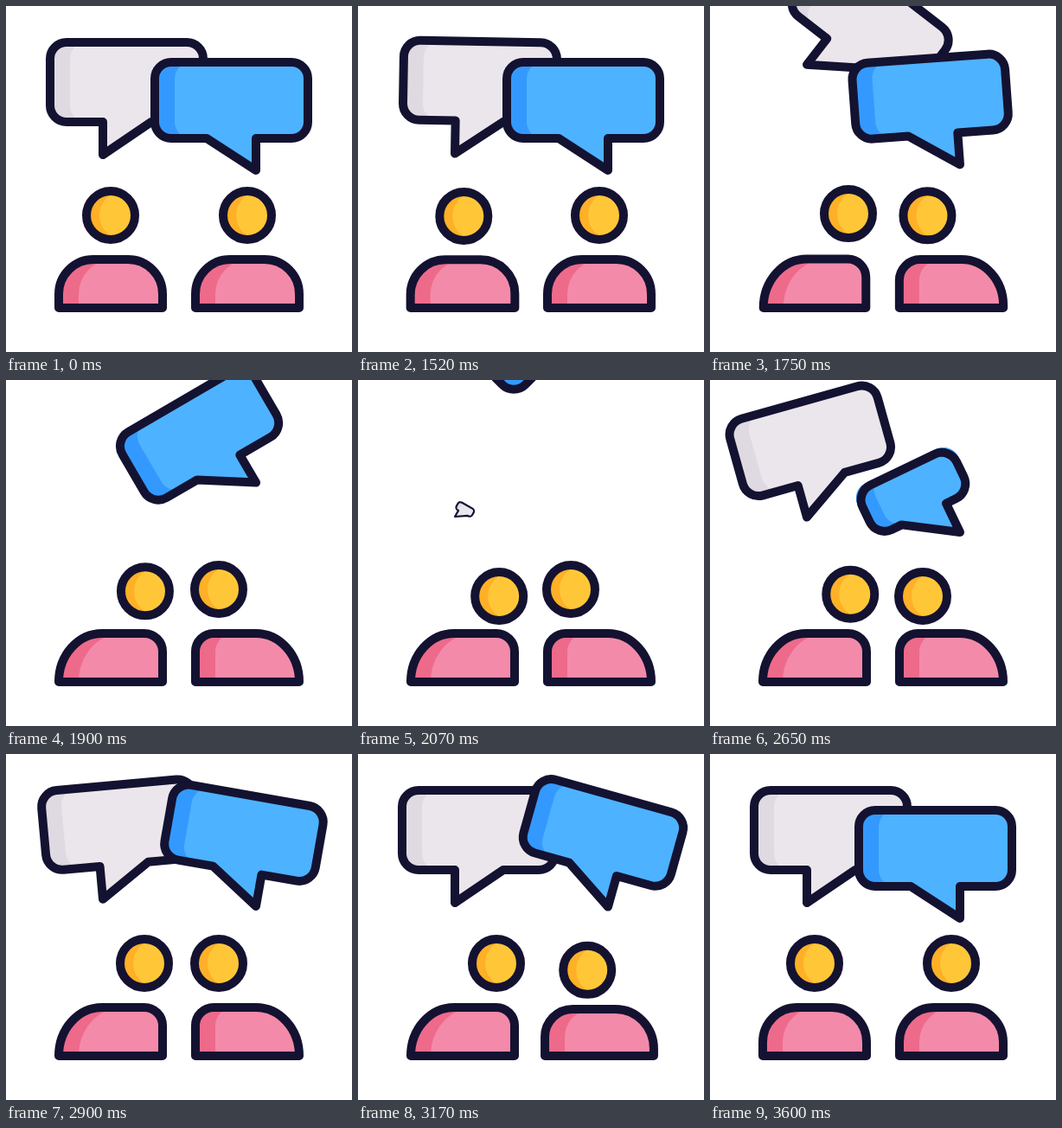
An HTML page for the animation above (3620 ms loop, 400 px wide and 400 px high).

```html
<!DOCTYPE html>
<html lang="en">
<head>
<meta charset="utf-8">
<title>Conversation</title>
<style>
  html, body { margin: 0; width: 100%; height: 100%; overflow: hidden; background: #fff; }
  svg { display: block; width: 100vw; height: 100vh; }
  .line { fill: none; stroke: #141231; stroke-width: 10; stroke-linejoin: round; }
</style>
</head>
<body>
<svg id="stage" viewBox="0 0 400 400"></svg>
<script>
const LOOP = 3620, START = 1520, SHADE = 23;
const stage = document.getElementById('stage');

function add(parent, tag, attrs = {}) {
  const el = document.createElementNS('http://www.w3.org/2000/svg', tag);
  for (const key in attrs) el.setAttribute(key, attrs[key]);
  return parent.appendChild(el);
}

// A shaded shape: dark base, clipped light area, outline.
let shapeCount = 0;
function makeShape(dark, light) {
  const group = add(stage, 'g');
  const id = 'clip' + shapeCount++;
  const clip = add(add(group, 'clipPath', { id }), 'path');
  const base = add(group, 'path', { fill: dark });
  const lit = add(add(group, 'g', { 'clip-path': `url(#${id})` }), 'path', { fill: light });
  const line = add(group, 'path', { class: 'line' });
  return {
    group,
    draw(outline, lightPath, fill = outline) {
      clip.setAttribute('d', fill);
      base.setAttribute('d', fill);
      lit.setAttribute('d', lightPath);
      line.setAttribute('d', outline);
    }
  };
}

const clamp = v => Math.min(1, Math.max(0, v));
const smooth = v => { v = clamp(v); return v * v * (3 - 2 * v); };

// Eased interpolation through [time, value] pairs.
function track(keys, t) {
  if (t <= keys[0][0]) return keys[0][1];
  for (let i = 1; i < keys.length; i++) {
    const [t0, a] = keys[i - 1], [t1, b] = keys[i];
    if (t < t1) return a + (b - a) * smooth((t - t0) / (t1 - t0));
  }
  return keys[keys.length - 1][1];
}

// Bubble outline around its tail tip at 0,0; the body can be partly grown.
function bubblePath(b, grow, inset = 0) {
  const tailL = Math.min(b.tail, 0), tailR = Math.max(b.tail, 0);
  const left = tailL + (b.left - tailL) * grow + inset;
  const right = tailR + (b.right - tailR) * grow;
  const top = b.bottom + (b.top - b.bottom) * (0.25 + 0.75 * grow);
  const r = Math.min(19, (right - tailR) * 0.8);
  const arc = (x, y) => `A${r} ${r} 0 0 1 ${x} ${y}`;
  return `M${left + r} ${top}H${right - r}${arc(right, top + r)}V${b.bottom - r}` +
    `${arc(right - r, b.bottom)}H${tailR}L0 0L${tailL} ${b.bottom}H${left + r}` +
    `${arc(left, b.bottom - r)}V${top + r}${arc(left + r, top)}Z`;
}

const POP = {
  turn: [[0, 30], [430, -16.2], [560, -16], [1030, 0]],
  lift: [[0, 14], [540, 14], [1030, 0]],
  scale: [[0, 0], [70, 1]],
  grow: [[0, 0.3], [80, 0.53], [260, 1]]
};

function drawBubble(b, t) {
  const out = Math.max(0, t - b.leave), back = t - b.enter;
  let turn = 45 * smooth(out / 350), lift = 0.00153 * out * out, scale = 1, grow = 1;
  if (back >= 0) {
    turn = track(POP.turn, back);
    lift = track(POP.lift, back);
    scale = track(POP.scale, back);
    grow = track(POP.grow, back);
  }
  const fillGrow = Math.min(1, grow + 0.07);
  b.shape.group.setAttribute('transform',
    `translate(${b.x} ${b.y - lift}) rotate(${turn * b.dir}) scale(${scale})`);
  b.shape.draw(bubblePath(b, grow), bubblePath(b, fillGrow, SHADE), bubblePath(b, fillGrow));
}

// Shoulders: lean > 0 to the right, < 0 to the left.
function torsoPath(cx, lean, squash, shift = 0) {
  const half = 60 * (1 + 0.05 * squash), top = 293 + 2 * squash, bottom = 349;
  const corner = amount => amount > 0
    ? [40 + 10 * amount, 40 + (bottom - top - 40) * amount]
    : [40 + 19 * amount, 40 + 19 * amount];
  const [lx, ly] = corner(lean), [rx, ry] = corner(-lean);
  const l = cx - half + shift, r = cx + half + shift;
  return `M${l} ${bottom}V${top + ly}A${lx} ${ly} 0 0 1 ${l + lx} ${top}` +
    `H${r - rx}A${rx} ${ry} 0 0 1 ${r} ${top + ry}V${bottom}Z`;
}

const circlePath = (x, y, r) =>
  `M${x - r} ${y}A${r} ${r} 0 1 1 ${x + r} ${y}A${r} ${r} 0 1 1 ${x - r} ${y}Z`;

function drawPerson(p, t) {
  const lean = track(p.lean, t), squash = track(p.squash, t);
  const [from, to] = p.nod;
  const nod = t > from && t < to ? 4 * (1 - Math.cos((t - from) / 500 * 2 * Math.PI)) : 0;
  const x = p.x + p.reach * lean + p.nodShift * nod;
  const y = 242 + 8 * squash + nod;
  p.torso.draw(torsoPath(p.x, lean * p.dir, squash), torsoPath(p.x, lean * p.dir, squash, SHADE));
  p.head.draw(circlePath(x, y, 28), circlePath(x + 15, y, 28));
}

const bubbles = [
  { x: 112, y: 172, left: -61, right: 116, top: -130, bottom: -38, tail: 56,
    dir: 1, leave: 1490, enter: 2050, shape: makeShape('#dfd9e2', '#ebe6ec') },
  { x: 289, y: 190, left: -117, right: 60, top: -125, bottom: -37, tail: -57,
    dir: -1, leave: 1685, enter: 2570, shape: makeShape('#3399ff', '#4db2ff') }
];

const person = settings => ({
  ...settings,
  torso: makeShape('#ee6a8b', '#f48aa9'),
  head: makeShape('#ffb026', '#ffc738')
});

const people = [
  person({ x: 121, reach: 39, dir: 1, nod: [1810, 2810], nodShift: 0.4,
    lean: [[1500, 0], [1690, 1], [3200, 1], [3400, 0]],
    squash: [[1500, 0], [1600, 1], [1740, -0.25], [1850, 0],
             [3200, 0], [3300, 1], [3440, -0.25], [3550, 0]] }),
  person({ x: 279, reach: -33, dir: -1, nod: [2400, 2900], nodShift: 0,
    lean: [[1610, 0], [1800, 1], [3060, 1], [3260, 0]],
    squash: [[1600, 0], [1690, 1], [1760, 0],
             [3060, 0], [3160, 1], [3300, -0.25], [3400, 0]] })
];

function render(t) {
  if (t < START) t = 0;
  bubbles.forEach(b => drawBubble(b, t));
  people.forEach(p => drawPerson(p, t));
}

const begin = performance.now();
function tick() {
  render((performance.now() - begin) % LOOP);
  requestAnimationFrame(tick);
}
tick();
</script>
</body>
</html>
```
